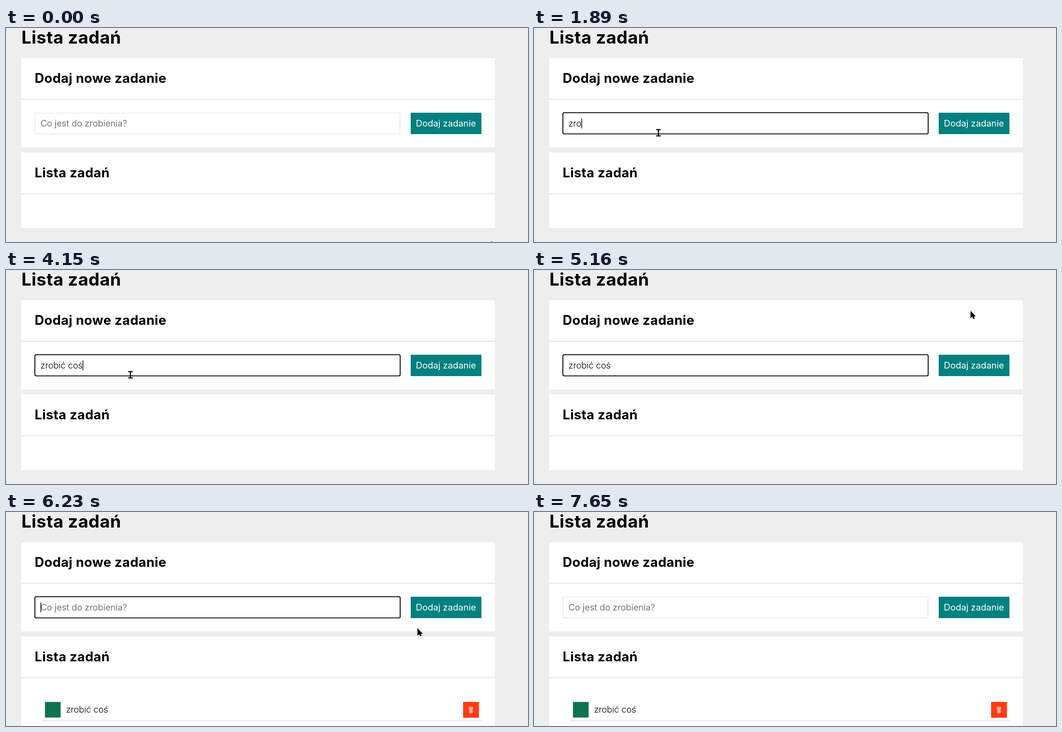
Recreate the animation shown at these times as an HTML page. Size 1166 by 480 pixels, loop 7.74 s.

```html
<!DOCTYPE html>
<html lang="pl">
<head>
<meta charset="utf-8">
<title>Lista zadań</title>
<style>
html, body { margin: 0; width: 100%; height: 100%; overflow: hidden; background: #eee; }
svg { display: block; }
text { font-family: Montserrat, Inter, sans-serif; font-size: 19.5px; white-space: pre; }
.h1 { font-size: 39px; font-weight: 700; letter-spacing: .5px; }
.h2 { font-size: 29.3px; font-weight: 700; letter-spacing: .4px; }
.light { font-weight: 300; }
.label { font-size: 20px; fill: #fff; }
.line { fill: #ddd; }
</style>
</head>
<body>
<svg width="1166" height="480" viewBox="0 0 1166 480">
  <text class="h1" x="34.5" y="34.5">Lista zadań</text>
  <rect x="34" y="68" width="1058" height="200" fill="#fff"/>
  <text class="h2" x="64" y="123">Dodaj nowe zadanie</text>
  <rect class="line" x="34" y="159" width="1058" height="1.5"/>
  <rect id="field" fill="#fff"/>
  <text id="hint" x="77" y="220.5" fill="#757575">Co jest do zrobienia?</text>
  <text id="typed" class="light" x="77" y="220.5"></text>
  <rect id="caret" y="203" width="1.5" height="22"/>
  <rect id="button" x="904" y="190" width="158" height="48"/>
  <text class="label" x="915.5" y="220.5">Dodaj zadanie</text>

  <rect id="panel" x="34" y="279" width="1058" fill="#fff"/>
  <text class="h2" x="64" y="335">Lista zadań</text>
  <rect class="line" x="34" y="371" width="1058" height="1.5"/>
  <g id="task">
    <rect x="87" y="426" width="35" height="35" fill="#0f7350"/>
    <text class="light" x="134" y="450">zrobić coś</text>
    <rect x="1021" y="426" width="35.5" height="35.5" fill="#ff3c14"/>
    <g fill="none" stroke="#fff">
      <path d="M1034.5 439l1 11.5q3 1 6 0l1-11.5M1037 440.5l.5 9M1040 440.5l-.5 9M1038.5 440.5v9"/>
      <ellipse cx="1038.5" cy="438.5" rx="4.5" ry="1.5"/>
    </g>
    <rect class="line" x="81" y="467" width="981" height="1.5"/>
  </g>

  <circle id="ring" r="13" fill="#fff000" fill-opacity=".5"/>
  <path id="arrow" d="M.5 .5V15.5L4 12.5L6.5 17.5L9 16.3L6.8 11.5H11Z" stroke="#000"/>
  <path id="beam" d="M-5 -7H5M-5 7H5M0 -7V7" stroke="#000" stroke-width="2.5" fill="none"/>
</svg>
<script>
const LOOP = 7740, TICK = 83.15, BLINK = 510;
const WORD = 'zrobić coś';
const FOCUS = 660, TYPE = 1480, TYPED = 4150, PRESS = 5890, ADD = 5970, BLUR = 7550;

// key points: time in ms, then letters typed
const typing = [[TYPE, 1], [1890, 3], [2490, 4], [3070, 6], [TYPED, 10]];
// key points: tick, then pointer position
const path = [
  [0, 1084, 478], [2, 271, 251], [4, 278, 235], [57, 278, 235], [59, 566, 82],
  [62, 975, 92], [69, 967, 212], [73, 967, 212], [75, 919, 261], [86, 1084, 440]
];

const el = id => document.getElementById(id);
const show = (id, on) => el(id).setAttribute('visibility', on ? 'visible' : 'hidden');
const set = (id, attrs) => { for (const k in attrs) el(id).setAttribute(k, attrs[k]); };

// linear interpolation through key points
function along(keys, at) {
  const i = keys.findIndex(k => k[0] > at);
  if (i < 1) return keys.at(i).slice(1);
  const [a, ...from] = keys[i - 1], [b, ...to] = keys[i];
  return from.map((v, j) => v + (to[j] - v) * (at - a) / (b - a));
}

function draw(t) {
  const within = (a, b) => t >= a && t < b;
  const done = t >= ADD, press = within(PRESS, ADD);
  const focus = within(FOCUS, PRESS) || within(ADD, BLUR);

  const count = t < TYPE || done ? 0 : Math.floor(along(typing, t)[0]);
  el('typed').textContent = WORD.slice(0, count);
  show('hint', !count);
  set('field', focus
    ? { x: 64.5, y: 190, width: 816, height: 47.5, rx: 3, stroke: '#101010', 'stroke-width': 2.2 }
    : { x: 64.8, y: 190.7, width: 815.4, height: 46.7, rx: 0, stroke: '#e8e8e8', 'stroke-width': 1.5 });

  // the caret stays solid while typing, then blinks
  const since = t - (done ? ADD : t < TYPE ? 730 : TYPED);
  show('caret', focus && Math.floor(since / BLINK) % 2 !== 1);
  set('caret', { x: 77 + (count ? el('typed').getComputedTextLength() : 0) });

  set('panel', { height: done ? 201 : 170 });
  show('task', done);

  const tick = Math.floor((t + 15) / TICK);
  const [x, y] = along(path, tick);
  const inRow = y > 189 && y < 239;
  const overField = inRow && x > 64 && x < 881;
  const hover = inRow && x > 903 && x < 1062;
  const seen = tick < 87;
  show('beam', seen && overField);
  show('arrow', seen && !overField);
  show('ring', press || within(FOCUS, 740));
  for (const id of ['beam', 'arrow', 'ring']) set(id, { transform: `translate(${x} ${y})` });
  set('arrow', { fill: press ? '#c47a1a' : '#000' });
  set('button', { fill: press ? '#00e6e6' : hover ? '#009999' : '#008080' });
}

function frame() {
  draw(performance.now() % LOOP);
  requestAnimationFrame(frame);
}
frame();
</script>
</body>
</html>
```
